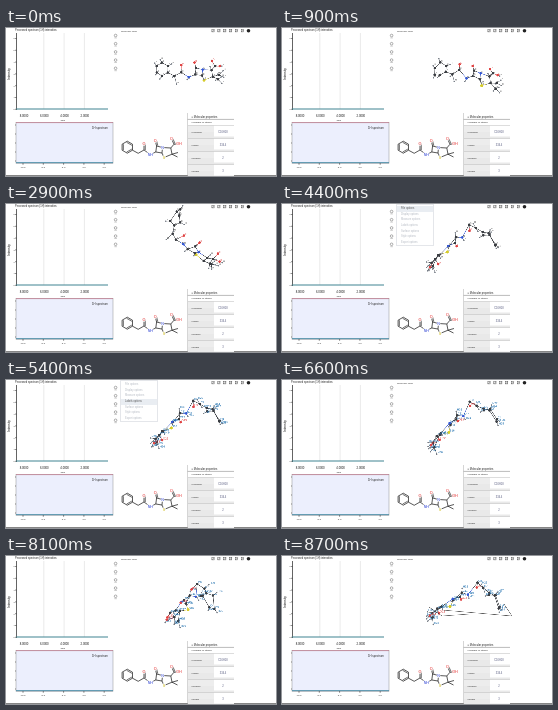
An HTML page with a canvas for the animation above (9200 ms loop, 270 by 148 pixels).

```html
<!DOCTYPE html>
<html lang="en">
<head>
<meta charset="utf-8">
<title>Molecule viewer</title>
<style>
html, body { margin: 0; width: 100%; height: 100%; overflow: hidden; background: #fff; }
svg, canvas { position: absolute; left: 0; top: 0; width: 270px; height: 148px; }
text, #menu { font-family: "Liberation Sans", Arial, sans-serif; }
#menu { position: absolute; left: 114px; top: 0; width: 38px; height: 42px; background: #fff;
  border: .5px solid #e4e6ea; box-sizing: border-box; visibility: hidden;
  font-size: 2.6px; line-height: 5.7px; color: #b4b9c2; padding-top: 1px; }
#menu div { padding-left: 4px; height: 5.7px; }
#menu .on { background: #e9edf2; color: #555; }
</style>
</head>
<body>
<svg id="page" viewBox="0 0 270 148"></svg>
<canvas id="view" width="1080" height="592"></canvas>
<div id="menu"></div>
<script>
const page = document.getElementById('page');
const menu = document.getElementById('menu');
const ctx = document.getElementById('view').getContext('2d');
const LOOP = 9200;

// ---------- molecule layout: element, x, y in the flat drawing, hydrogens ----------
const layout = [];
for (let i = 0; i < 6; i++) {
  const a = (i * 60 + 30) * Math.PI / 180;
  layout.push(['C', 121.3 + 6 * Math.cos(a), 119.2 + 6 * Math.sin(a), i ? 1 : 0]);
}
layout.push(
  ['C', 132.2, 125.3, 2], ['C', 138, 122, 0], ['O', 138, 115.5, 0], ['N', 144.3, 126.5, 1],
  ['C', 149.8, 124, 1], ['C', 150.6, 118, 0], ['O', 149.3, 113, 0], ['N', 156.5, 119.5, 0],
  ['C', 156, 125, 1], ['S', 158, 129.5, 0], ['C', 166, 126.2, 0], ['C', 164.8, 120, 1],
  ['C', 171.5, 129, 3], ['C', 172, 124.5, 3], ['C', 168, 116.2, 0], ['O', 165.5, 111, 0],
  ['O', 173, 116, 1]);
const bonds = '0-1 1-2 2-3 3-4 4-5 5-0 0-6 6-7 7-8 7-9 9-10 10-11 11-12 11-13 13-14 14-10 14-15 15-16 16-17 17-13 16-18 16-19 17-20 20-21 20-22'
  .split(' ').map(s => s.split('-').map(Number));
const doubles = ['0-1', '2-3', '4-5', '7-8', '11-12', '20-21'];

// ---------- static page ----------
let out = '';
const line = (x1, y1, x2, y2, c = '#222', w = .5) =>
  out += `<path d="M${x1} ${y1}L${x2} ${y2}" stroke="${c}" stroke-width="${w}"/>`;
const rect = (x, y, w, h, f, s = 'none') =>
  out += `<rect x="${x}" y="${y}" width="${w}" height="${h}" fill="${f}" stroke="${s}" stroke-width=".4"/>`;
const label = (x, y, s, size = 2.5, c = '#333', extra = '') =>
  out += `<text x="${x}" y="${y}" font-size="${size}" fill="${c}" ${extra}>${s}</text>`;
const mid = 'text-anchor="middle"';

function plots() {
  label(9, 3.4, 'Processed spectrum (1H) intensities', 2.6, '#222');
  for (let i = 0; i < 4; i++) {
    const x = 18 + i * 20.3;
    if (i) line(x - .5, 5, x - .5, 81, '#d4d4d4');
    label(x, 88.5, (8 - i * 2) + '.0000', 2.8, '#111', mid);
  }
  label(57, 92.5, 'ppm', 2.2, '#222', mid);
  for (let i = 0; i < 7; i++) {
    const y = 10.5 + i * 11.8;
    line(9, y, 10.5, y);
    label(8.6, y + .8, 6 - i, 2.2, '#222', 'text-anchor="end"');
  }
  line(10.5, 5, 10.5, 82, '#222', .7);
  line(10, 81, 102, 81, '#3f8391', 1);
  label(0, 0, 'Intensity', 3.2, '#111', 'transform="translate(3.6 52) rotate(-90)"');

  rect(10, 94.5, 97, 41, '#eceffd', '#777');
  line(10, 94.6, 107, 94.6, '#c4788f', .7);
  line(10, 134.6, 107, 134.6, '#4689a3', .9);
  for (let i = 0; i < 5; i++) {
    const x = 17 + i * 20.3;
    line(x, 135, x, 136.8);
    label(x, 139.8, (10 - i * 2) + '.0', 2.5, '#222', mid);
    line(9, 97 + i * 9, 10, 97 + i * 9);
  }
  label(86, 101, '1H spectrum', 2.8, '#222');
  line(0, 147.5, 270, 147.5, '#666', .8);
}

function toolbars() {
  for (let i = 0; i < 5; i++) {
    const y = 7.5 + i * 8.2;
    out += `<circle cx="109.6" cy="${y}" r="1.3" fill="none" stroke="#777" stroke-width=".6"/>`;
    line(108.3, y + 2.4, 110.9, y + 2.4, '#999');
  }
  label(115, 3.8, 'Molecule view', 2.5, '#333');
  for (let i = 0; i < 6; i++) {
    const x = 207 + i * 5.9;
    rect(x - 1.1, 1.7, 2.2, 2.2, 'none', '#333');
    line(x - 1, 3.8, x + 1, 1.8, '#333', .4);
  }
  out += '<circle cx="242.5" cy="2.8" r="1.8" fill="#222"/>';
}

function table() {
  label(185.5, 90, '≡  Molecular properties', 2.6, '#222');
  line(181.5, 91.4, 228, 91.4, '#777');
  label(185, 95.4, '›  Number of atoms', 2.5, '#222');
  ['Formula', 'Mass', 'Donors', 'Rings'].forEach((name, i) => {
    const y = 97.5 + i * 13;
    rect(182, y, 26, 13, '#ededed');
    rect(182, y + 6.5, 46, 6.5, '#e9e9e9');
    rect(208, y + 2, 20, 9, '#fff');
    line(182, y, 228, y, '#aaa', .4);
    label(185, y + 7.5, '›  ' + name, 2.5, '#222');
    label(217, y + 7.5, ['C16H18', '334.4', '2', '3'][i], 2.6, '#53577c', mid);
  });
  line(181.5, 85, 181.5, 148, '#aaa');
}

function sketch() {
  for (const [a, b] of bonds) {
    const [, x1, y1] = layout[a], [, x2, y2] = layout[b];
    line(x1, y1, x2, y2, '#111', .7);
    if (!doubles.includes(a + '-' + b)) continue;
    const n = Math.hypot(x2 - x1, y2 - y1), dx = (y1 - y2) / n * 1.3, dy = (x2 - x1) / n * 1.3;
    line(x1 + dx, y1 + dy, x2 + dx, y2 + dy, '#111', .6);
  }
  const ink = { N: '#2338d0', O: '#e32222', S: '#c9b400' };
  for (const [el, x, y, h] of layout) {
    if (el === 'C') continue;
    label(x, y + 1.3, el + (h ? 'H' : ''), 3.7, ink[el],
      mid + ' stroke="#fff" stroke-width="1.4" paint-order="stroke"');
  }
}

plots();
toolbars();
table();
sketch();
page.innerHTML = out;
menu.innerHTML = ['File', 'Display', 'Measure', 'Labels', 'Surface', 'Style', 'Export']
  .map(s => `<div>${s} options</div>`).join('');

// ---------- 3D model: the flat layout, bent at the side chain and puckered ----------
const atoms = layout.map(([el, sx, sy, h], i) => {
  const x = (sx - 144.5) / .86, y = (sy - 120.8) * 1.1;
  const z = 12 - .9 * Math.abs(x + 12) + 4 * Math.sin(i * 2);
  return { el, h, p: [x, y, z] };
});
const heavy = atoms.length;
const links = bonds.slice();

// Hydrogens sit on the side facing away from the neighbours
for (let i = 0; i < heavy; i++) {
  const { p, h } = atoms[i], away = [0, 0, 0];
  for (const b of bonds) {
    if (!b.includes(i)) continue;
    const v = atoms[b[0] === i ? b[1] : b[0]].p.map((c, k) => c - p[k]);
    v.forEach((c, k) => away[k] -= c / Math.hypot(...v));
  }
  const n = Math.hypot(...away) || 1;
  for (let k = 0; k < h; k++) {
    const a = k / h * 2 * Math.PI + 1, s = h > 1 ? 4 : 0;
    const swing = [Math.cos(a), Math.sin(a), Math.sin(a + 1)];
    atoms.push({ el: 'H', p: p.map((c, j) => c + away[j] / n * 4.5 + s * swing[j]) });
    links.push([i, atoms.length - 1]);
  }
}

// Each drag: start, end, then the pose reached: centre, roll, yaw, pitch
const rest = [183, 43, 0, 0, 0];
const drags = [
  [0, 600, [185, 44, 2, 0, 15]],
  [1500, 2300, [185, 44, 10, 0, -20]],
  [2500, 3400, [176, 32, 130, 0, -60]],
  [3500, 4200, [180, 33, 178, 0, -80]],
  [5600, 6600, [181, 34, 176, 0, -95]],
  [6600, 7600, [184, 42, 180, 100, -85]],
  [7600, 8600, [186, 37, 190, 0, -90]]
];

function poseAt(t) {
  let pose = rest;
  for (const [start, end, next] of drags) {
    const f = Math.max(0, Math.min(1, (t - start) / (end - start)));
    pose = pose.map((v, k) => v + (next[k] - v) * f);
  }
  return pose;
}

function turn(a, b, deg) {
  const r = deg * Math.PI / 180, c = Math.cos(r), s = Math.sin(r);
  return [a * c - b * s, a * s + b * c];
}

function project([x, y, z], [cx, cy, roll, yaw, pitch]) {
  [y, z] = turn(y, z, pitch);
  [x, y] = turn(x, y, roll);
  [x, z] = turn(x, z, yaw);
  const k = 1 + z / 400;
  return [cx + x * k, cy + y * k, z];
}

const colour = { C: '#3a3d42', H: '#777d86', N: '#3458d4', O: '#e04444', S: '#d6cc2c' };

function stroke(points, c, w) {
  ctx.beginPath();
  points.forEach(p => ctx.lineTo(p[0], p[1]));
  ctx.strokeStyle = c;
  ctx.lineWidth = w;
  ctx.stroke();
}

function drawMolecule(t) {
  const pose = poseAt(t), pts = atoms.map(a => project(a.p, pose));
  for (const [a, b] of links) {
    const p = pts[a], q = pts[b], m = [(p[0] + q[0]) / 2, (p[1] + q[1]) / 2];
    stroke([p, m], colour[atoms[a].el], .5);
    stroke([m, q], colour[atoms[b].el], .5);
  }
  const shifts = t >= 5300;
  const order = pts.map((p, i) => i).sort((a, b) => pts[a][2] - pts[b][2]);
  ctx.font = `${shifts ? 2.8 : 2.3}px "Liberation Sans", Arial, sans-serif`;
  for (const i of order) {
    const el = atoms[i].el, [x, y] = pts[i];
    ctx.beginPath();
    ctx.arc(x, y, el === 'H' ? .7 : el === 'S' ? 1.5 : 1.25, 0, 7);
    ctx.fillStyle = colour[el];
    ctx.fill();
    ctx.fillStyle = el === 'O' ? '#d83c3c' : shifts ? '#1f6fae' : '#444';
    ctx.fillText(shifts ? el + (i + 1) : el, x + .8, y - .8);
  }
}

function drawGuides(t) {
  if (t >= 1600 && t < 2300) {
    stroke([[150, 36], [229, 41]], '#555', .35);
    stroke([[147, 61], [202, 64]], '#555', .35);
  }
  if (t >= 8700) {
    stroke([[147, 51], [160, 60], [188, 58]], '#333', .4);
    stroke([[160, 54], [230, 60], [222, 48]], '#333', .4);
  }
}

function drawMenu(t) {
  const open = t >= 4400 && t < 5700;
  menu.style.visibility = open ? 'visible' : 'hidden';
  const row = Math.min(3, Math.floor((t - 4400) / 240));
  [...menu.children].forEach((d, i) => d.className = i === row ? 'on' : '');
}

function frame(now) {
  const t = Math.floor((now % LOOP) / 100) * 100;
  ctx.setTransform(4, 0, 0, 4, 0, 0);
  ctx.clearRect(0, 0, 270, 148);
  drawMolecule(t);
  drawGuides(t);
  drawMenu(t);
  requestAnimationFrame(frame);
}
requestAnimationFrame(frame);
</script>
</body>
</html>
```
